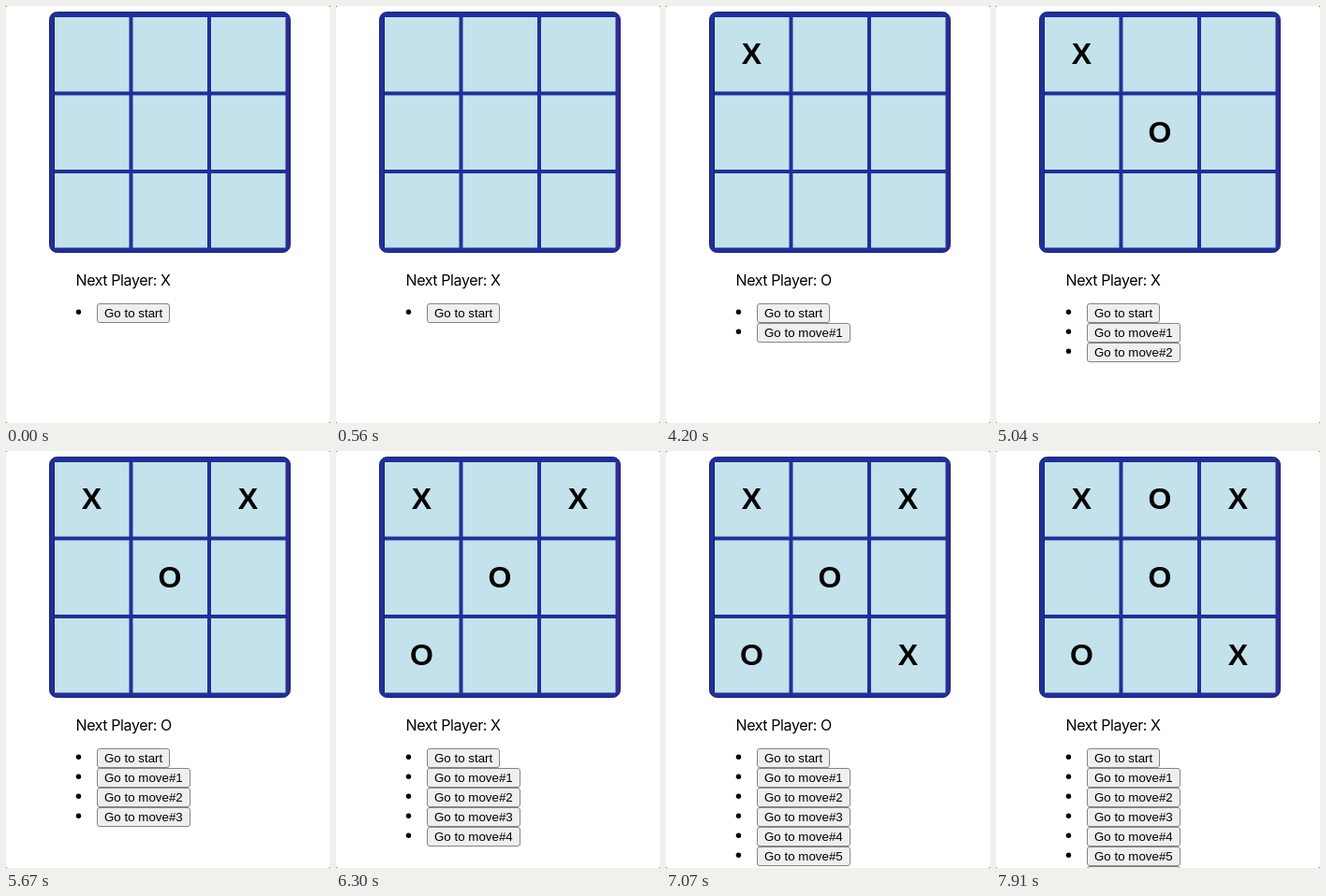
These frames come from a looping animation (346x446 px, 8 s). An HTML page:

```html
<!DOCTYPE html>
<html lang="en">
<head>
<meta charset="utf-8">
<title>Tic-tac-toe</title>
<style>
  html, body { margin: 0; width: 100%; height: 100%; overflow: hidden; background: #fff; }
  svg { display: block; width: 100%; height: 100%; }
  .mark { font: bold 32px "Liberation Sans", Arial, sans-serif; text-anchor: middle; }
  .status { font: 16px Inter, sans-serif; letter-spacing: -.4px; }
  .label { font: 13.333px "Liberation Sans", Arial, sans-serif; }
</style>
</head>
<body>
<svg id="stage" viewBox="0 0 346 446"></svg>
<script>
const LOOP = 8000;
const PITCH = 83.5;
const ROW = 21;
const MOVES = [
  { at: 3850, cell: 0 },
  { at: 5040, cell: 4 },
  { at: 5670, cell: 2 },
  { at: 6230, cell: 6 },
  { at: 7000, cell: 8 },
  { at: 7910, cell: 1 }
];

const stage = document.getElementById("stage");

function add(parent, tag, attrs, text) {
  const el = document.createElementNS("http://www.w3.org/2000/svg", tag);
  for (const key in attrs) el.setAttribute(key, attrs[key]);
  if (text) el.textContent = text;
  parent.appendChild(el);
  return el;
}

const player = i => (i % 2 ? "O" : "X");
const cellX = i => (i % 3) * PITCH;
const cellY = i => Math.floor(i / 3) * PITCH;

function drawBoard() {
  add(stage, "rect", { x: 46.5, y: 6.5, width: 257, height: 257, rx: 8, fill: "#20309a", stroke: "#1d2470" });
  add(stage, "path", { d: "M301 12V258", stroke: "#302b92", "stroke-width": 4 });
  for (let i = 0; i < 9; i++) {
    add(stage, "rect", { x: 52 + cellX(i), y: 12 + cellY(i), width: 79.5, height: 79.5, fill: "#c3e2eb" });
  }
  add(stage, "path", { d: "M51.5 12V258", stroke: "#16205f" });
}

function drawRow(i) {
  const g = add(stage, "g", { transform: `translate(0 ${318 + i * ROW})` });
  add(g, "circle", { cx: 77.5, cy: 9.3, r: 2.7 });
  add(g, "rect", { x: 97.5, y: 0.5, width: i ? 99 : 77, height: 20, rx: 2.5, fill: "#efefef", stroke: "#858585" });
  add(g, "text", { x: 105, y: 15, class: "label" }, i ? "Go to move#" + i : "Go to start");
  return g;
}

function drawCorners() {
  for (const x of [0, 345]) {
    for (const y of [0, 445]) add(stage, "rect", { x, y, width: 1, height: 1, fill: "#777" });
  }
}

drawBoard();
const status = add(stage, "text", { x: 74.5, y: 299, class: "status" });
drawRow(0);
const steps = MOVES.map((move, i) => ({
  at: move.at,
  mark: add(stage, "text", { x: 91.5 + cellX(move.cell), y: 62 + cellY(move.cell), class: "mark" }, player(i)),
  row: drawRow(i + 1)
}));
drawCorners();

function render(time) {
  let played = 0;
  for (const { at, mark, row } of steps) {
    const shown = time >= at;
    if (shown) played++;
    mark.style.display = row.style.display = shown ? "" : "none";
  }
  status.textContent = "Next Player: " + player(played);
}

const start = performance.now();
function tick() {
  render((performance.now() - start) % LOOP);
  requestAnimationFrame(tick);
}
tick();
</script>
</body>
</html>
```
